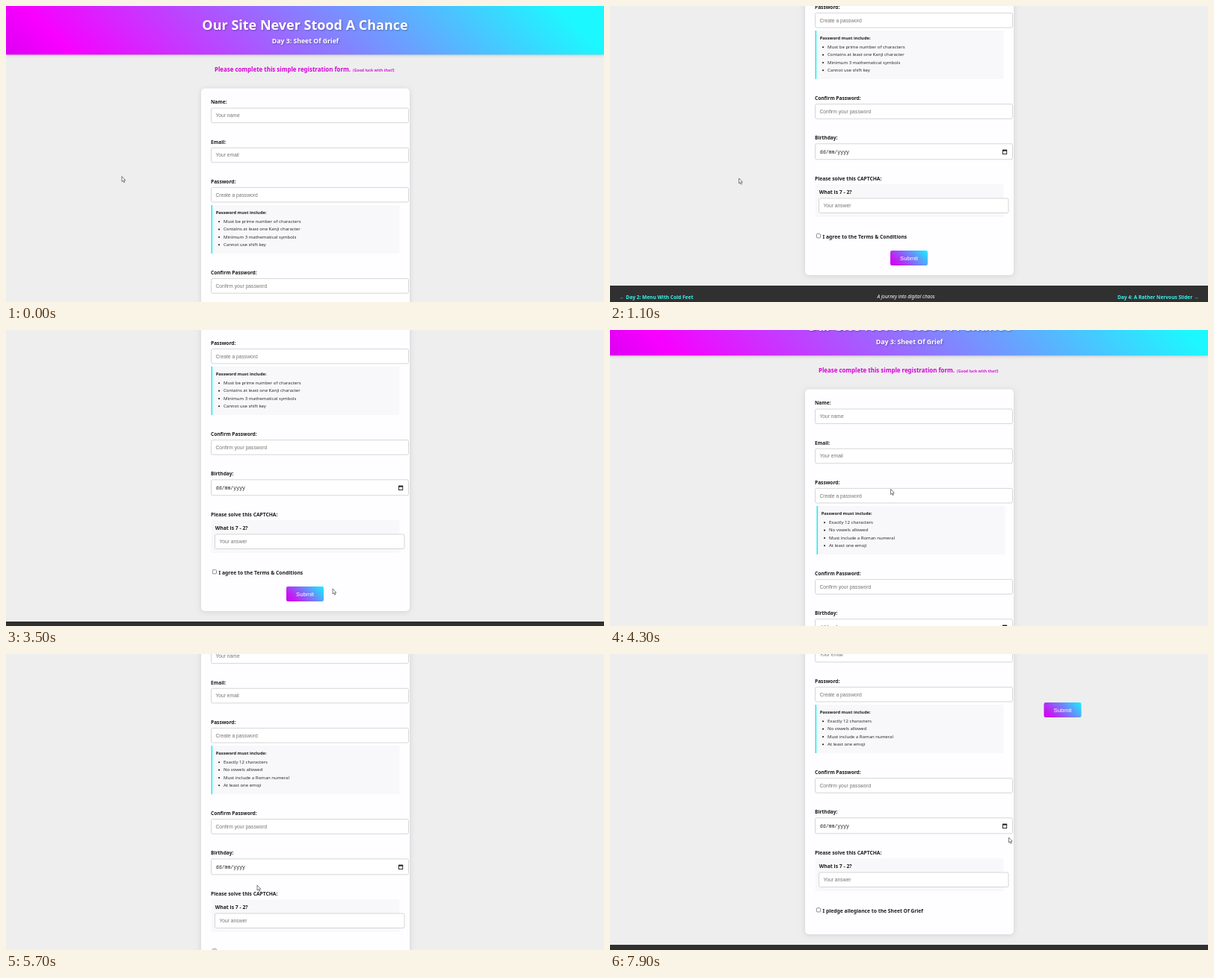
An HTML page with a canvas for the animation above (8 s loop, 800 by 397 pixels).

```html
<!DOCTYPE html>
<html lang="en">
<head>
<meta charset="utf-8">
<title>Registration form</title>
<style>
  html, body { margin: 0; width: 100%; height: 100%; overflow: hidden; background: #eee; }
  canvas { display: block; width: 800px; height: 397px; }
</style>
</head>
<body>
<canvas id="stage"></canvas>
<script>
const W = 800, H = 397, LOOP = 8000, STEP = 100;
const HAND = '"Noto Sans", "Open Sans", sans-serif';
const UI = '"Liberation Sans", sans-serif';
const MONO = '"Liberation Mono", monospace';
const INK = '#1c1c1c', PAPER = '#f8f7f9', CYAN = '#10f6ee';
const LEFT = 274.5, FIELD_W = 264, PANEL_W = 252, ROW = 53.2, BUTTON_W = 50, BUTTON_H = 20;
const HOME = { x: 375, y: 562 };

const canvas = document.getElementById('stage');
const ctx = canvas.getContext('2d');
const ratio = window.devicePixelRatio || 1;
canvas.width = W * ratio;
canvas.height = H * ratio;

const FIELDS = [
  ['Name:', 'Your name'],
  ['Email:', 'Your email'],
  ['Password:', 'Create a password'],
  ['Confirm Password:', 'Confirm your password'],
  ['Birthday:', '']
];
const RULES_A = ['Must be prime number of characters', 'Contains at least one Kanji character',
  'Minimum 3 mathematical symbols', 'Cannot use shift key'];
const RULES_B = ['Exactly 12 characters', 'No vowels allowed',
  'Must include a Roman numeral', 'At least one emoji'];

// Eased moves: start, duration, distance
const SCROLL = [[450, 722, 241], [3350, 730, -210], [5350, 566, 168]];
const FLEE_X = [[6500, 300, 105], [7300, 300, 100.5]];
const FLEE_Y = [[6500, 300, -326], [7300, 300, 28]];

// Pointer stops: time, x, y
const POINTER = [
  [0, 155, 228.5], [200, 160, 268], [1100, 172.5, 231], [1800, 815, 310], [2300, 500, 420],
  [3100, 437, 347], [3500, 437, 347], [4300, 375.5, 213.5], [5700, 336, 310],
  [6500, 385, 368], [7300, 495, 60], [7900, 533.5, 246]
];
const ARROW = new Path2D('M0 0V7L1.6 5.6 2.7 8.2 3.8 7.7 2.8 5.2H4.8Z');

const clamp = u => Math.max(0, Math.min(1, u));
const ease = u => u * u * (3 - 2 * u);
const travel = (moves, t) => moves.reduce((sum, [start, span, dist]) =>
  sum + dist * ease(clamp((t - start) / span)), 0);

function pointerAt(t) {
  const next = POINTER.findIndex(stop => stop[0] > t);
  if (next < 0) return POINTER.at(-1).slice(1);
  const [t0, x0, y0] = POINTER[next - 1], [t1, x1, y1] = POINTER[next];
  const u = ease((t - t0) / (t1 - t0));
  return [x0 + (x1 - x0) * u, y0 + (y1 - y0) * u];
}

// y is the middle of the capitals
function text(str, x, y, size, { color = INK, style = 'bold', font = HAND, align = 'left' } = {}) {
  ctx.font = `${style} ${size}px ${font}`;
  ctx.textAlign = align;
  ctx.fillStyle = color;
  ctx.fillText(str, x, y + size * 0.355);
}

function box(x, y, w, h, r, fill, stroke) {
  ctx.beginPath();
  ctx.roundRect(x, y, w, h, r);
  ctx.fillStyle = fill;
  ctx.fill();
  if (stroke) {
    ctx.strokeStyle = stroke;
    ctx.lineWidth = 0.85;
    ctx.stroke();
  }
}

function shadow(color, blur, x, y, paint) {
  ctx.save();
  ctx.shadowColor = color;
  ctx.shadowBlur = blur * ratio;
  ctx.shadowOffsetX = x * ratio;
  ctx.shadowOffsetY = y * ratio;
  paint();
  ctx.restore();
}

// CSS-like 45 degree gradient over a rectangle
function diagonal(x, y, w, h, stops) {
  const d = (w + h) / 4, cx = x + w / 2, cy = y + h / 2;
  const g = ctx.createLinearGradient(cx - d, cy + d, cx + d, cy - d);
  stops.forEach(([at, color]) => g.addColorStop(at, color));
  return g;
}

function header() {
  const fill = diagonal(0, 0, W, 65, [[0, '#dc00f2'], [0.1, '#f800ff'], [0.93, '#1cf8ff']]);
  shadow('rgba(0,0,0,.2)', 4, 0, 1, () => box(0, 0, W, 65.3, 0, fill));
  const white = { color: '#fff', align: 'center' };
  shadow('rgba(0,0,0,.3)', 2, 1, 1, () => {
    text('Our Site Never Stood A Chance', 400, 26, 18, white);
    text('Day 3: Sheet Of Grief', 400.5, 46.8, 8.7, white);
  });
  text('Please complete this simple registration form.', 279, 85, 7.9, { color: '#d400d8' });
  text('(Good luck with that!)', 464, 85.8, 5.15, { color: '#d818dc' });
}

function input(x, y, w, h, hint) {
  box(x, y, w, h, 2, '#fff', '#cfcfcf');
  text(hint, x + 6, y + h / 2, 6.7, { color: '#757575', style: 'normal', font: UI });
}

function fields() {
  FIELDS.forEach(([label, hint], i) => {
    const y = 137 + i * ROW + (i > 2 ? 69 : 0);
    text(label, 274, y - 7.9, 6.6);
    input(LEFT, y, FIELD_W, i < 4 ? 19.6 : 21, hint);
  });
  text('dd/mm/yyyy', 280.7, 429.5, 6.55, { style: 'normal', font: MONO });
  ctx.strokeStyle = INK;
  ctx.lineWidth = 0.9;
  ctx.strokeRect(525.5, 427.6, 5.2, 5);
  box(525.1, 426.6, 6, 2, 0, INK);
}

function rules(list, dx) {
  ctx.save();
  ctx.translate(dx, 0);
  box(LEFT, 267, PANEL_W, 65, 0, PAPER);
  box(LEFT, 267, 1.6, 65, 0, CYAN);
  text('Password must include:', 280.7, 277, 5.75);
  list.forEach((rule, i) => {
    const y = 289 + i * 10.35;
    box(284, y - 0.8, 2.1, 2.1, 1.05, INK);
    text(rule, 291, y, 6, { color: '#2c2c2c', style: 'normal' });
  });
  ctx.restore();
}

function captcha() {
  text('Please solve this CAPTCHA:', 274, 465.5, 6.7);
  box(LEFT, 473, PANEL_W, 44, 0, PAPER);
  text('What is 7 - 2?', 279.7, 484, 6.8);
  input(279.5, 492, 253.5, 19.5, 'Your answer');
}

function consent(label) {
  box(276.3, 539.7, 5.2, 5.2, 0.9, '#fff', '#777');
  text(label, 284.6, 543.3, 6.75);
}

function button(x, y) {
  const fill = diagonal(x, y, BUTTON_W, BUTTON_H, [[0, '#cc00f0'], [0.2, '#c41cf4'], [1, '#14f4ff']]);
  box(x, y, BUTTON_W, BUTTON_H, 2.2, fill);
  text('Submit', x + BUTTON_W / 2, y + BUTTON_H / 2, 7.7,
    { color: '#fff', style: 'normal', font: UI, align: 'center' });
}

function footer(y) {
  box(0, y, W, 40, 0, '#313031');
  const mid = y + 15.2, link = '#38f4ea';
  text('← Day 2: Menu With Cold Feet', 13, mid, 6.6, { color: link });
  text('A journey into digital chaos', 396, mid, 6.4, { color: '#fff', style: 'italic', align: 'center' });
  text('Day 4: A Rather Nervous Slider →', 787.5, mid, 6.6, { color: link, align: 'right' });
}

function pointer([x, y]) {
  ctx.save();
  ctx.translate(x, y);
  ctx.fillStyle = '#fff';
  ctx.fill(ARROW);
  ctx.strokeStyle = '#555';
  ctx.lineWidth = 0.75;
  ctx.stroke(ARROW);
  ctx.restore();
}

function draw(t) {
  const loose = t >= 6600;
  const lift = loose ? BUTTON_H : 0;
  const scroll = Math.round(travel(SCROLL, t));
  const shake = t >= 4100 && t < 4600 ? (t % 200 ? 2 : -2) : 0;

  ctx.setTransform(ratio, 0, 0, ratio, 0, 0);
  ctx.fillStyle = '#eee';
  ctx.fillRect(0, 0, W, H);

  ctx.translate(0, -scroll);
  header();
  shadow('rgba(0,0,0,.12)', 7, 0, 1, () => box(261, 110.5, 279, 484.5 - lift, 5, '#fefdff'));
  fields();
  rules(t < 4000 ? RULES_A : RULES_B, shake);
  captcha();
  consent(t < 7500 ? 'I agree to the Terms & Conditions' : 'I pledge allegiance to the Sheet Of Grief');
  footer(609 - lift);
  button(HOME.x + travel(FLEE_X, t), HOME.y + travel(FLEE_Y, t));
  ctx.translate(0, scroll);
  pointer(pointerAt(t));
}

function tick() {
  const t = performance.now() % LOOP;
  draw(Math.floor(t / STEP) * STEP);
  requestAnimationFrame(tick);
}
tick();
</script>
</body>
</html>
```
